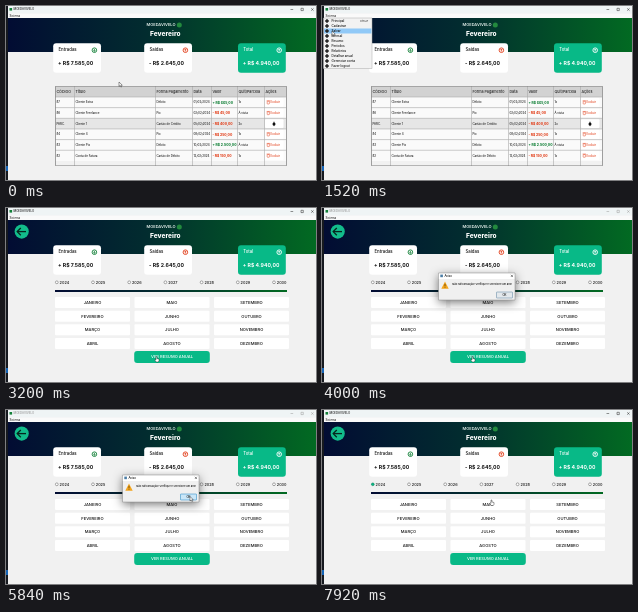
Write an HTML page with a canvas that moves like this. It is 310 by 174 pixels and loops after 8000 ms.

```html
<!DOCTYPE html>
<html lang="pt-BR">
<head>
<meta charset="utf-8">
<title>Controle financeiro</title>
<style>
html, body { margin: 0; width: 100%; height: 100%; overflow: hidden; background: #f1f1f1 }
canvas { display: block; width: 310px; height: 174px }
</style>
</head>
<body>
<canvas id="stage"></canvas>
<script>
const LOOP = 8000, APP = 'MOEDAVIVELO';
const GREEN = '#08b987', RED = '#e2401c', DARK = '#111', MONEY = '#128038';
const canvas = document.getElementById('stage'), g = canvas.getContext('2d');
const ratio = window.devicePixelRatio || 1;
canvas.width = 310 * ratio;
canvas.height = 174 * ratio;

function box(x, y, w, h, fill, r = 0, stroke) {
  g.beginPath();
  g.roundRect(x, y, w, h, r);
  if (fill) { g.fillStyle = fill; g.fill(); }
  if (stroke) { g.strokeStyle = stroke; g.lineWidth = .5; g.stroke(); }
}
function dot(x, y, r, fill, stroke, width = .6) {
  g.beginPath();
  g.arc(x, y, r, 0, 7);
  if (fill) { g.fillStyle = fill; g.fill(); }
  if (stroke) { g.strokeStyle = stroke; g.lineWidth = width; g.stroke(); }
}
function line(points, color, width = .5) {
  g.beginPath();
  points.forEach(([x, y]) => g.lineTo(x, y));
  g.strokeStyle = color;
  g.lineWidth = width;
  g.stroke();
}
function text(s, x, y, size, color = DARK, weight = 500, align = 'left') {
  g.font = `${weight} ${size}px Inter, sans-serif`;
  g.textAlign = align;
  g.textBaseline = 'middle';
  g.fillStyle = color;
  g.fillText(s, x, y);
}
function shade(x0, x1) {
  const s = g.createLinearGradient(x0, 0, x1, 0);
  s.addColorStop(0, '#020c33');
  s.addColorStop(.45, '#022c2f');
  s.addColorStop(1, '#026a22');
  return s;
}

function card(x, label, value, color) {
  const green = color === 'white', ink = green ? '#fff' : DARK;
  box(x, 37.2, 47.8, 29.6, green ? GREEN : '#fff', 3);
  text(label, x + 5.3, 44.2, 4.3, ink);
  dot(x + 41.2, 44.2, 2.3, null, color, .9);
  const up = label === 'Entradas' ? 1 : -1;
  line([[x + 41.2, 44.2 + 1.3 * up], [x + 41.2, 44.2 - 1.3 * up]], color, .8);
  line([[x + 40.1, 44.2], [x + 41.2, 44.2 + 1.2 * up], [x + 42.3, 44.2]], color, .6);
  text(value, x + 4.8, 57.8, 5.2, ink, 700);
}

function frame(inactive) {
  box(0, 0, 310, 174, '#f1f1f1');
  box(0, 0, 310, 7.5, '#eff4f5');
  box(0, 7.5, 310, 4.5, '#fafafa');
  const ink = inactive ? '#999' : '#222';
  box(3.5, 2, 2.6, 2.6, MONEY);
  text(APP, 7.5, 3.5, 2.9, ink);
  line([[284.5, 3.5], [287.2, 3.5]], ink);
  box(295, 2.3, 2.3, 2.3, null, 0, ink);
  line([[305.2, 2.3], [307.6, 4.7]], ink);
  line([[305.2, 4.7], [307.6, 2.3]], ink);
  text('Sistema', 3.5, 9.9, 2.8, '#333');
  box(0, 12, 310, 34, shade(1, 310));
  text(APP, 155, 19.2, 4, '#e8f2ee', 600, 'center');
  dot(173.3, 19, 2.5, '#238a3e');
  text('Fevereiro', 159.3, 28.2, 6.6, '#fff', 800, 'center');
  card(47.2, 'Entradas', '+ R$ 7.585,00', MONEY);
  card(138.2, 'Saídas', '- R$ 2.645,00', RED);
  card(232, 'Total', '+ R$ 4.940,00', 'white');
  box(0, 0, 2, 174, '#16191f');
  box(0, 160, 2, 5, '#1565b8');
}

const COLS = [49, 68, 149, 186, 205, 231, 258, 280];
const HEADS = ['CÓDIGO', 'Título', 'Forma Pagamento', 'Data', 'Valor', 'Quit/Parcela', 'Ações'];
const ROWS = [
  ['87', 'Cliente Extra', 'Débito', '01/02/2024', '+ R$ 665,00', '1x'],
  ['86', 'Cliente Freelance', 'Pix', '02/02/2024', '- R$ 45,00', 'À vista'],
  ['PARC.', 'Cliente 1', 'Cartão de Crédito', '05/02/2024', '- R$ 400,00', '2x'],
  ['84', 'Cliente 4', 'Pix', '08/02/2024', '- R$ 250,00', '1x'],
  ['83', 'Cliente Pix', 'Débito', '10/02/2024', '+ R$ 2.500,00', 'À vista'],
  ['82', 'Conta de Fatura', 'Cartão de Débito', '12/02/2024', '- R$ 150,00', '1x']
];
function table() {
  box(49, 80, 231, 80, '#f1f1f1');
  box(49, 80, 231, 11, '#d2d2d2');
  HEADS.forEach((h, i) => text(h, COLS[i] + 1.4, 85.8, 3.7, '#222'));
  ROWS.forEach((row, i) => {
    const y = 91 + i * 10.65, mid = y + 5.6;
    box(49, y, 231, 10.65, i === 2 ? '#e6e6e6' : '#fafafa');
    row.forEach((s, c) => {
      const value = c === 4;
      const color = value ? (s[0] === '+' ? MONEY : RED) : '#222';
      text(s, COLS[c] + 1.4, mid, value ? 3.4 : 2.9, color, value ? 800 : 500);
    });
    box(259, y + 1, 18.5, 8.8, '#fff', 1);
    if (i === 2) {
      dot(268, mid, 1.5, '#111');
      line([[268, mid - 2.2], [268, mid + 2.2]], '#111', .8);
    } else {
      box(261.2, mid - 1.4, 2.2, 2.8, null, .4, RED);
      line([[260.6, mid - 1.8], [264, mid - 1.8]], RED);
      text('Excluir', 264.6, mid, 2.9, RED);
    }
    line([[49, y], [280, y]], '#aaa', .6);
  });
  COLS.forEach(x => line([[x + .5, 80], [x + .5, 160]], '#aaa', .6));
  box(49.5, 80.5, 231, 79, null, 0, '#777');
}

const MENU = ['Principal', 'Cadastrar', 'Salvar', 'Mensal', 'Resumo', 'Períodos', 'Relatórios',
  'Detalhar anual', 'Gerenciar conta', 'Fazer logout'];
function menu(active) {
  box(1.5, 12, 48.5, 50.5, '#f2f2f2', 0, '#aaa');
  MENU.forEach((s, i) => {
    const y = 15 + i * 5;
    if (i === active) box(2, y - 2.5, 47.5, 5, '#91c9f7');
    dot(5, y, 1.3, '#444', '#111', .9);
    text(s, 9.5, y, 3.1);
  });
  text('Ctrl+P', 38, 15, 2.7, '#333');
}

const MONTHS = ['JANEIRO', 'FEVEREIRO', 'MARÇO', 'ABRIL', 'MAIO', 'JUNHO', 'JULHO', 'AGOSTO',
  'SETEMBRO', 'OUTUBRO', 'NOVEMBRO', 'DEZEMBRO'];
function yearView(picked) {
  dot(15.7, 23.6, 7.1, '#12bc8b');
  line([[20, 23.6], [11.3, 23.6]], '#06261e', 1.3);
  line([[14.8, 20], [11.2, 23.6], [14.8, 27.2]], '#06261e', 1.3);
  for (let i = 0; i < 7; i++) {
    const x = 50.8 + i * 36.2, on = picked && i === 0;
    dot(x, 74.3, 1.4, on ? GREEN : '#fff', on ? '#067a52' : '#555', .5);
    text(2024 + i, x + 2.8, 74.4, 3.8);
  }
  box(49, 82, 232, 2, shade(49, 281));
  MONTHS.forEach((m, i) => {
    const x = [49, 128.5, 208][i / 4 | 0], y = 89 + (i % 4) * 13.65;
    box(x, y, 75, 11, '#fff', 1);
    text(m, x + 37.5, y + 5.8, 4.1, DARK, 500, 'center');
  });
  box(128.2, 143.1, 75.6, 11.9, GREEN, 3);
  text('VER RESUMO ANUAL', 166, 149.2, 4.1, '#fff', 500, 'center');
}

function dialog(hover) {
  g.save();
  g.shadowColor = '#0008';
  g.shadowBlur = 10 * ratio;
  g.shadowOffsetY = 2.5 * ratio;
  box(116.5, 65, 76.5, 27, '#f0f0f0');
  g.restore();
  box(116.5, 65, 76.5, 6, '#fff');
  box(116.5, 65, 76.5, 27, null, 0, '#888');
  box(118.3, 66.6, 2.6, 2.6, '#4b7da5');
  text('Aviso', 122.5, 68, 2.9);
  line([[188.8, 66.8], [191, 69]], '#222');
  line([[188.8, 69], [191, 66.8]], '#222');
  g.beginPath();
  g.moveTo(123, 73.5);
  g.lineTo(126.7, 80.7);
  g.lineTo(119.3, 80.7);
  g.closePath();
  g.fillStyle = '#f3a51e';
  g.fill();
  line([[123, 75.8], [123, 78.4]], '#493000', .7);
  dot(123, 79.5, .4, '#493000');
  text('Não há transação! Verifique e selecione um ano!', 130.2, 76, 2.6);
  box(174.5, 84, 16, 6, hover ? '#c9e6f8' : '#e3e8ec', .4, hover ? '#167fbd' : '#567f9d');
  text('OK', 182.5, 87.1, 2.8, DARK, 500, 'center');
}

// Pointer stops: time, x, y
const PATH = [[0, 113, 76], [480, 113, 76], [1160, 5, 10], [1340, 6, 11], [1520, 10, 25], [1760, 11, 35],
  [2240, 11, 34], [2360, 12, 35], [3040, 150, 148.5], [4080, 150, 148.5], [4480, 173, 99], [5280, 183, 86.5],
  [5440, 184, 86.5], [5840, 184, 86.5], [6240, 93.5, 88], [6560, 56, 77], [6800, 54.5, 76], [7000, 54.5, 76],
  [7760, 158, 84], [7920, 169, 90], [8000, 169, 90]];
function pointer(t) {
  const i = Math.max(1, PATH.findIndex(p => p[0] > t));
  const [t0, x0, y0] = PATH[i - 1], [t1, x1, y1] = PATH[i];
  const u = (t - t0) / (t1 - t0), e = u * u * (3 - 2 * u);
  return [x0 + (x1 - x0) * e, y0 + (y1 - y0) * e];
}
function cursor(x, y, hand) {
  const shape = hand
    ? [[0, 0], [.9, 0], [.9, 2], [3, 2.5], [3, 4.3], [2.3, 5.5], [.2, 5.5], [-1.3, 3.4], [-.8, 2.8], [0, 3.4]]
    : [[0, 0], [0, 4.5], [1.1, 3.5], [1.9, 5.1], [2.6, 4.8], [1.9, 3.2], [3.3, 3.2]];
  g.beginPath();
  shape.forEach(([dx, dy]) => g.lineTo(x + dx, y + dy));
  g.closePath();
  g.fillStyle = '#fff';
  g.fill();
  g.strokeStyle = '#222';
  g.lineWidth = .45;
  g.stroke();
}

function draw(now) {
  const t = now % LOOP, [x, y] = pointer(t);
  const warned = t >= 3680 && t < 5900;
  g.setTransform(ratio, 0, 0, ratio, 0, 0);
  frame(warned);
  if (t < 2200) {
    table();
    if (t >= 1240) menu(y < 12.5 ? -1 : Math.floor((y - 12.5) / 5));
  } else {
    yearView(t >= 6940);
  }
  if (warned) dialog(x > 174 && y < 90);
  cursor(x, y, (t > 2960 && t < 4120) || t > 7840);
  requestAnimationFrame(draw);
}
requestAnimationFrame(draw);
</script>
</body>
</html>
```
